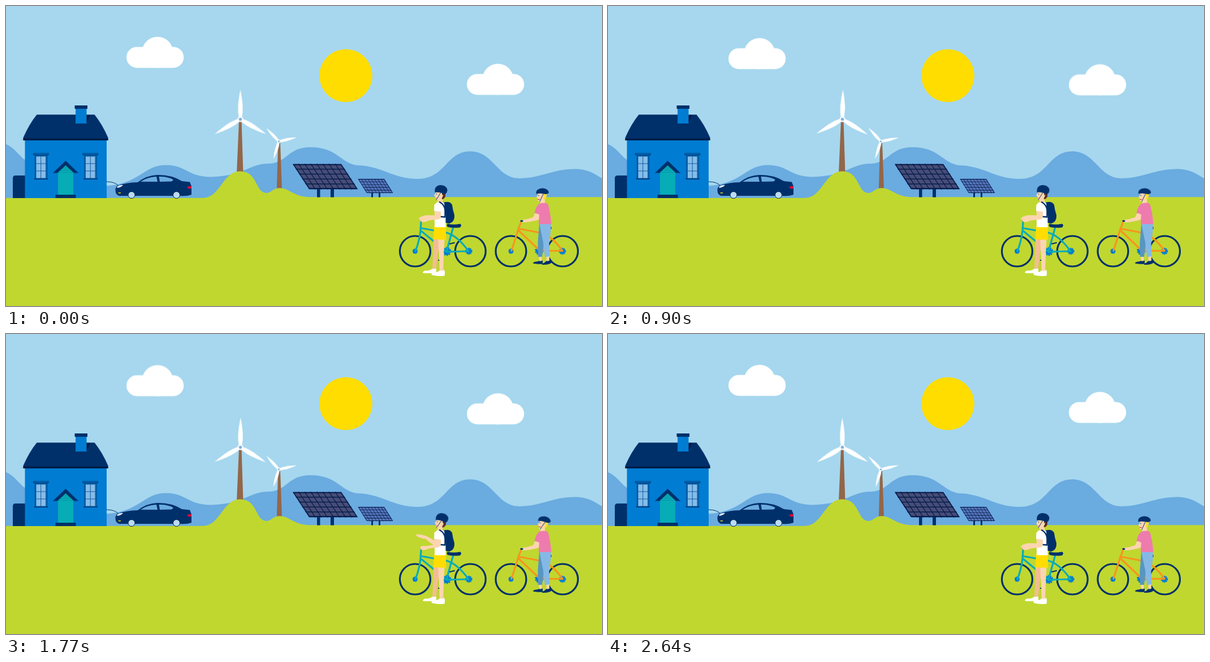
Recreate the animation shown at these times as an HTML page. Size 1054 by 531 pixels, loop 2670 ms.

```html
<!DOCTYPE html>
<html lang="en">
<head>
<meta charset="utf-8">
<title>Green energy landscape</title>
<style>
  html, body { margin: 0; width: 100%; height: 100%; overflow: hidden; background: #a6d7ee; }
  svg { display: block; width: 100vw; height: 100vh; }
  .navy { fill: #00306a; }
  .blue { fill: #007cd2; }
  .skin { fill: #fcd5b0; }
  .white { fill: #fff; }
  .line { fill: none; stroke-linecap: round; stroke-linejoin: round; }
  .move { animation: 2670ms linear infinite; }
  .spin { animation-name: spin; }
  .cloud-a { animation-name: cloud-a; }
  .cloud-b { animation-name: cloud-b; }
  .shine { animation-name: shine; }
  .arm { animation-name: arm; transform-origin: 767px 372px; }
  .nod { animation-name: nod; }
  .nod.him { --tilt: 5deg; transform-origin: 768px 347px; }
  .nod.her { --tilt: 10deg; transform-origin: 949px 350px; }

  @keyframes spin {
    0%, .64% { transform: rotate(0deg); }
    99%, 100% { transform: rotate(360deg); }
  }
  @keyframes cloud-a {
    0%, 100% { transform: translateY(0); }
    13.5% { transform: translateY(.8px); }
    33.7% { transform: translateY(2.2px); }
    41.6% { transform: translateY(2.7px); }
    56.2% { transform: translateY(1.7px); }
    76.4% { transform: translateY(-.6px); }
    84% { transform: translateY(-.7px); }
  }
  @keyframes cloud-b {
    0%, 100% { transform: translateY(0); }
    13.5% { transform: translateY(-.1px); }
    33.7% { transform: translateY(.8px); }
    41.6% { transform: translateY(1.2px); }
    56.2% { transform: translateY(2.2px); }
    66% { transform: translateY(2.6px); }
    76.4% { transform: translateY(2.1px); }
  }
  @keyframes shine {
    0%, 41.6% { transform: translateX(-118px); }
    70.8%, 100% { transform: translateX(118px); }
  }
  @keyframes arm {
    0%, 37.5% { transform: rotate(-33deg) scaleX(.8); animation-timing-function: ease-in-out; }
    51.7%, 79.8% { transform: none; animation-timing-function: ease-in-out; }
    94.4%, 100% { transform: rotate(-33deg) scaleX(.8); }
  }
  @keyframes nod {
    0%, 31.5% { transform: rotate(0deg); animation-timing-function: ease-in-out; }
    41.6%, 79.8% { transform: rotate(var(--tilt)); animation-timing-function: ease-in-out; }
    94.4%, 100% { transform: rotate(0deg); }
  }
</style>
</head>
<body>
<svg viewBox="0 0 1054 531" preserveAspectRatio="none">
  <defs>
    <g id="cloud" class="white">
      <rect x="213" y="72.400" width="101.300" height="37" rx="18.500"/>
      <circle cx="268" cy="82" r="27.500"/>
    </g>
    <path id="blade" d="M-2.500 -3C-5.500 -16 -4 -32 0 -52.500C4 -32 5.500 -16 2.500 -3z"/>
    <g id="rotor" class="white">
      <use href="#blade"/>
      <use href="#blade" transform="rotate(120)"/>
      <use href="#blade" transform="rotate(240)"/>
      <circle r="5"/>
      <circle r="2.700" fill="#78aedb"/>
    </g>
    <g id="panel">
      <path fill="currentColor" d="M0 0H86V44H0z"/>
      <path class="line" stroke="#061c4b" stroke-width="1.500" d="M0 9H86M0 17.700H86M0 26.400H86M0 35H86M10.800 0V44M21.500 0V44M32.300 0V44M43 0V44M53.800 0V44M64.500 0V44M75.300 0V44"/>
      <path fill="none" stroke="#061c4b" stroke-width="2" d="M1 1H85V43H1z"/>
    </g>
    <g id="window">
      <path class="navy" d="M48 260.500H75.500V264H73V305H74V307H50V305H51V264H48z"/>
      <path class="blue" d="M49 261.500H74.500V263H49zM51.800 264.500H72.200V305.500H51.800z"/>
      <path fill="#85bde8" d="M53 266H70.500V305H53z"/>
      <path fill="none" stroke="#0b4f97" stroke-width=".9" d="M53 266H70.500V305H53zM61.700 266V305M53 279H70.500M53 292H70.500"/>
    </g>
    <g id="gear" class="blue">
      <circle r="5"/>
      <circle r="5.300" fill="none" stroke="#007cd2" stroke-width="2" stroke-dasharray="2 1.330"/>
    </g>
    <clipPath id="glass"><path d="M508 281H592.500L619.500 323H537z"/></clipPath>
  </defs>

  <path fill="#a6d7ee" d="M0 0H1054V531H0z"/>
  <circle cx="601" cy="123.300" r="46.800" fill="#ffdd00"/>
  <g class="move cloud-a"><use href="#cloud"/></g>
  <g transform="translate(602 47.800)"><g class="move cloud-b"><use href="#cloud"/></g></g>

  <path fill="#6aabe0" d="M0 244.500C14 250 22 264 33 272C80 318 150 322 190 317C238 310 246 281.500 283 281.500C318 281.500 322 302.500 362 302.500C420 301 430 280 462 279C498 279 496 250 539 250C586 250 592 279 622 282C668 284 684 306 728 306C778 306 778 257.300 821 257.300C862 257.300 868 305 908 305C944 305 968 288.500 1006 288.500C1030 288.500 1042 298 1054 305V345H0z"/>

  <!-- turbines -->
  <path fill="#936649" d="M412 203H416.500L419.500 296H408zM481.200 242H485L488 326H478.800z"/>
  <g transform="translate(414.500 200.500)"><g class="move spin"><use href="#rotor"/></g></g>
  <g transform="translate(482.500 239.700) rotate(-43) scale(.62)"><g class="move spin"><use href="#rotor"/></g></g>

  <path fill="#c0d730" d="M0 339.800H348C379 339.800 383 292.500 414 292.500C446 292.500 440 331 461 331C469 331 472 322.300 484 322.300C502 322.300 508 338.300 540 338.300H1054V531H0z"/>

  <!-- solar panels -->
  <path class="navy" d="M550 323H555.500V338.500H550zM574 323H580V338.500H574zM646 330H649V338.500H646zM659 330H662V338.500H659z"/>
  <g color="#474d77" transform="matrix(1 0 .66 1.010 507 279.700)"><use href="#panel"/></g>
  <g color="#5677bd" transform="matrix(.54 0 .35 .57 622.500 306)"><use href="#panel"/></g>
  <g clip-path="url(#glass)">
    <path class="move shine white" opacity=".33" d="M566 280H594L568 324H538z"/>
  </g>

  <!-- house -->
  <path class="navy" d="M12 340V305Q12 300 17 300H34V340z"/>
  <path class="blue" d="M33.500 236H178V340H33.500z"/>
  <path class="navy" d="M54.500 192.300H156.500Q170 209 180.500 233V237.500H30.500V233Q41 209 54.500 192.300z"/>
  <path fill="#001a43" d="M30.500 234.500H180.500V237.800H30.500zM142 193H149L142 208z"/>
  <path class="blue" d="M123 181H142.500V208H123z"/>
  <path class="navy" d="M121.500 176H144V182H121.500z"/>
  <use href="#window"/>
  <use href="#window" x="87.500"/>
  <path fill="#06acb6" d="M105.500 279L119 293V334H92V293z"/>
  <path class="line" stroke="#078f9f" stroke-width=".7" d="M100 285.500H111M97 288.500H114M94 291.500H117M92 294.500H119"/>
  <path class="navy" d="M105.500 274L128 295.500H120L105.500 282L91 295.500H83zM87.500 334H123.500V340H87.500z"/>

  <!-- car -->
  <path class="line" stroke="#00306a" d="M178 311Q193 311 198.500 318"/>
  <path class="navy" d="M194 330Q192 322 197 318Q212 312.500 233 312Q249 299.500 268 299Q293 298.500 311 310L325 311.500L328 319V334Q320 337 308 336H200Q195 334 194 330z"/>
  <path fill="#6aabe0" d="M238 311Q249 303 266 302L268 311zM270.500 302Q286 301.500 296 307.500L293 310.500L272 311z"/>
  <path fill="#d7e9f7" d="M196 320Q201 316 207 317Q204 321 197 322z"/>
  <path fill="#e4003a" d="M320 320L328 318.500V323H322z"/>
  <path fill="#ffdd00" d="M198.500 330H203V331.500H199z"/>
  <g fill="#b9dcf2" stroke="#001a43" stroke-width="1">
    <circle cx="222" cy="334.500" r="6"/>
    <circle cx="301.500" cy="334.500" r="6"/>
  </g>

  <!-- teal bike -->
  <g class="line" stroke="#00306a" stroke-width="3.200">
    <circle cx="723.500" cy="434" r="27"/>
    <circle cx="821.300" cy="434" r="27"/>
    <circle cx="893" cy="434" r="27"/>
    <circle cx="984.500" cy="434" r="27"/>
  </g>
  <circle class="blue" cx="723.500" cy="434" r="4.500"/>
  <use href="#gear" x="818.500" y="434"/>
  <g transform="translate(779.500 434.500) scale(1.250)"><use href="#gear"/></g>
  <path class="line" stroke="#06acb6" stroke-width="3.200" d="M734 383L733 398Q731 416 724 434M733 393L778 401Q798 406 818 434M734 398L779 435L818 434M791 391L779 435"/>
  <path class="line" stroke="#00306a" stroke-width="2" d="M785 421L793 419M765 450H770"/>
  <path class="navy" d="M781 385.500Q792 388 803 385.500Q807 388 803 392Q790 393.500 781 391Q778 388 781 385.500z"/>
  <path class="line" stroke="#00306a" stroke-width="3" d="M734 380H740"/>

  <!-- man -->
  <path fill="#f3bd93" d="M756 412H769L763 441L760.500 470H754L755 440z"/>
  <path class="white" d="M754 465H761V473H738Q736 470 741 468.500Q749 469 754 465z"/>
  <path class="skin" d="M764 411H775.500L774 444L773 474H767L766 444z"/>
  <path class="white" d="M767 468Q771 470 775 467Q777 472 775.500 477.500Q763 479 752.500 476Q752 472 757 471.500Q763 471.500 767 468z"/>
  <path fill="#ffdd00" d="M757 389H778V414L756 413z"/>
  <path class="navy" d="M773 348Q785 344 789 352Q790 361 793 370Q794 382 784 385Q775 385 773 375z"/>
  <path class="white" d="M763 347Q771 345 775 349L777.500 372V391.500H758V357Q758 349 763 347z"/>
  <path class="skin" d="M764 336H772V347Q767 351 763.500 347z"/>
  <path class="line" stroke="#00306a" stroke-width="2.400" d="M767 347Q776 352 776.500 362V373.500L764 372.500"/>
  <g class="move nod him">
    <path fill="#5b2f22" d="M768 328H777V337Q775 342 771 342z"/>
    <path class="skin" d="M760 328H771V334Q774 334 772 338Q770 343 764 344Q759 343 759.500 338L757 335L759.500 332z"/>
    <path class="navy" d="M758.500 330Q757 319 767 317Q778 316.500 780.500 325Q780.500 332 775 333Q768 329 758.500 330z"/>
    <path class="line" stroke="#00306a" d="M769 330L761 343"/>
    <circle cx="761.500" cy="333" r=".8" class="navy"/>
    <path class="line" stroke="#d9505a" stroke-width=".9" d="M760.500 340H763"/>
  </g>
  <path class="skin" d="M758 364H769V372Q768 377.500 762 378L748 379.500Q742 383 735 382Q731 381 733 376.500Q738 374 744 375.500L760 372z"/>
  <path class="move arm skin" d="M769 371Q768 377 762 375.500Q752 372 742 362.500Q735 362 729 359.500Q724 357 726 354.500Q736 354.500 744 358L759 366z"/>
  <path class="skin" d="M757.500 361H768.500V371Q768 377 762 375.500L758 371z"/>
  <path class="white" d="M757.500 352Q761 346 769 350V364L757 362.500z"/>

  <!-- orange bike -->
  <circle class="blue" cx="893" cy="434" r="4.500"/>
  <use href="#gear" x="984" y="434"/>
  <g transform="translate(943 433) scale(1.250)"><use href="#gear"/></g>
  <path class="line" stroke="#f7941d" stroke-width="3.200" d="M911 382L906 395L894 433M906 394L948 402Q966 408 984 433M906 397L944 433L984 433.500M960 396L948 433"/>
  <path class="navy" d="M951 390H963Q966 392 964 395L951 396z"/>

  <!-- woman -->
  <path class="skin" d="M942 438H947.500V453H943zM955 438H961V453H956z"/>
  <path fill="#5796c4" d="M943 386H954L951 420L948 444H941L940.500 420z"/>
  <path class="navy" d="M942.500 451Q946 452.500 949 450V456.500Q940 457.500 932 455.500Q932 453 937 452.500Q940 452.500 942.500 451z"/>
  <path fill="#85b9e5" d="M943 384H963.500Q964.500 400 960.500 418L961.500 443L953 444.500L950 418z"/>
  <path class="navy" d="M956 451Q959 452.500 962 449.500L965 454Q961 458.500 948 458Q948 455 952 454.500z"/>
  <path class="skin" d="M945 338H953V350Q949 353 945 350z"/>
  <path class="skin" d="M937 364H948Q947 376 940 379Q928 382 916 383Q910 383 911 379Q922 378 932 374z"/>
  <path fill="#ee7bae" d="M944 349.500Q952 347.500 958 350Q962 360 964.500 386H942L943 369L934.500 366Q938 352 944 349.500z"/>
  <path class="line" stroke="#00306a" stroke-width="3" d="M911 380.500H913"/>
  <g class="move nod her">
    <path fill="#ffdd2d" d="M949 330H956.500Q957 339 952.500 342.500Q950 342 949 337z"/>
    <path class="skin" d="M941 331H950V336Q953 336 951 340Q949 346 944 346.500Q940 346 940.500 341L938 338L940.500 335z"/>
    <path class="navy" d="M937.500 332.500Q937 323.500 948 322.500Q958 322.500 960 330Q958 334 951 332.500Q944 331 937.500 332.500z"/>
    <path class="line" stroke="#00306a" d="M950 333L944 346"/>
    <circle cx="942" cy="335.500" r=".8" class="navy"/>
    <path class="line" stroke="#e4003a" d="M941 342.500H943.500"/>
  </g>
</svg>
</body>
</html>
```
